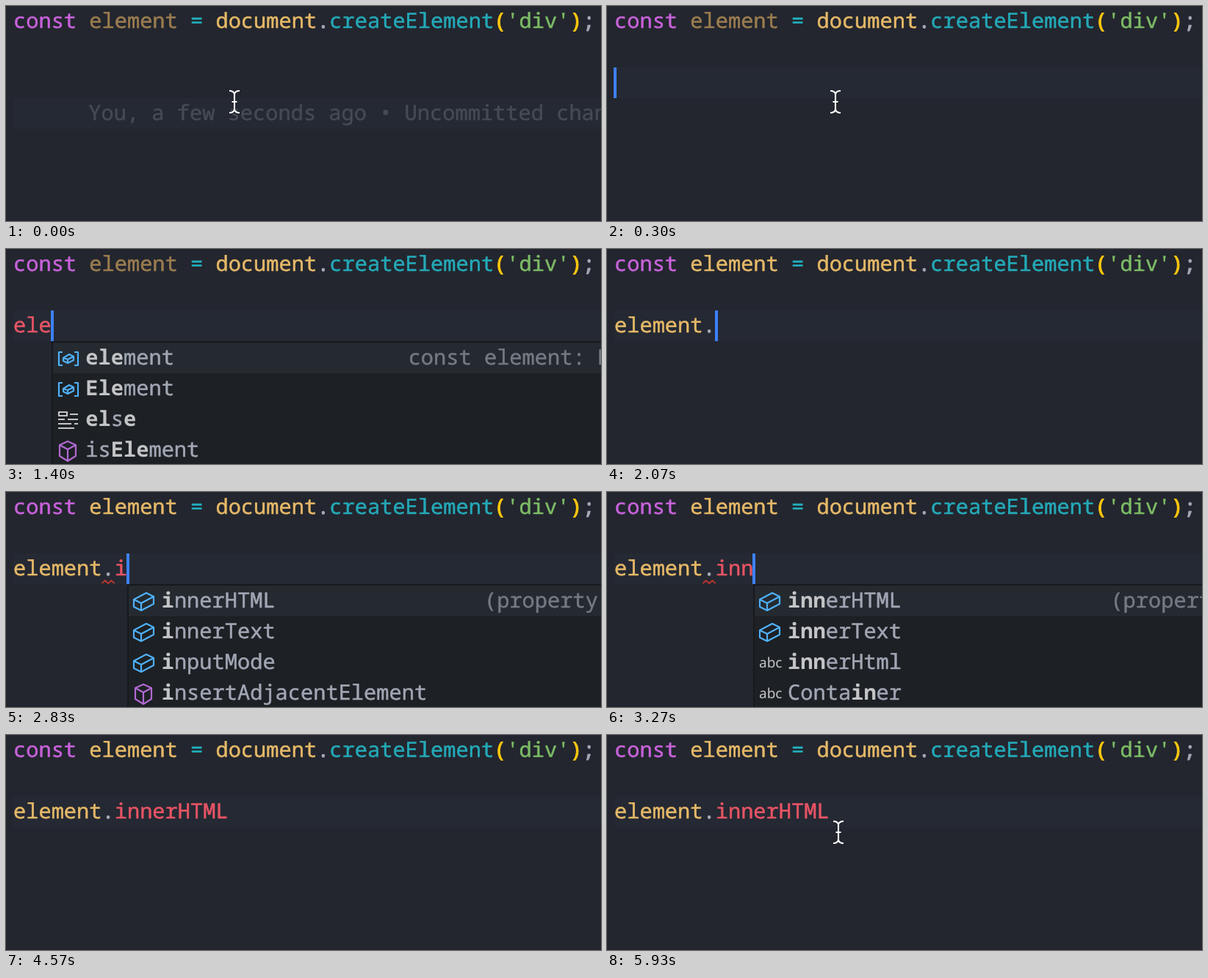
Animation, 810 px wide and 294 px high, one loop 5960 ms. Source, as an HTML page:

```html
<!DOCTYPE html>
<html lang="en">
<head>
<meta charset="utf-8">
<title>Typing with code completion</title>
<style>
  html, body { margin: 0; width: 100%; height: 100%; overflow: hidden; background: #23262e; }
  svg { display: block; width: 810px; height: 294px; }
  text {
    font: 28.7px "Noto Sans Mono", "DejaVu Sans Mono", monospace;
    font-variant-ligatures: none;
    text-rendering: geometricPrecision;
    white-space: pre;
  }
  /* A thin outline gives the letters their medium weight. */
  tspan { fill: currentColor; stroke: currentColor; stroke-width: .5; }
  .keyword { color: #c862db; }
  .name { color: #e6b968; }
  .dim { color: #9b7d50; }
  .op { color: #22b0bf; }
  .func { color: #24a9b8; }
  .paren { color: #ffc70f; stroke-width: 1; }
  .string { color: #7cbc66; }
  .punct { color: #a3a9b5; stroke-width: 1; }
  .fresh { color: #e65464; }
  .blame { color: #464a54; }
  .item { color: #a1a6b4; }
  .match { color: #c3c4c6; font-weight: 700; stroke: none; }
  .detail { color: #747983; }
  .line { fill: #252933; }
  .caret { fill: #3d80fb; }
  .panel { fill: #1d2024; }
  .edge { fill: #17191d; }
  .chosen { fill: #242a30; }
  .icon, .squiggle, .beam { fill: none; stroke-width: 2.2; }
  .icon { stroke-linejoin: round; }
  .field, .variable { stroke: #4fb0f8; }
  .method { stroke: #b169d3; }
  .snippet { stroke: #c3c4c6; }
  .abc { font: 19px "Noto Sans", "Open Sans", sans-serif; fill: #c3c4c6; }
  .squiggle { stroke: #b8342f; stroke-width: 1.8; }
  .beam { stroke: #fff; stroke-width: 2.1; }
  .beam.back { stroke: #23262e; stroke-width: 4.4; }
</style>
</head>
<body>
<svg viewBox="0 0 810 294">
  <defs>
    <path id="beam" d="M-7-15q6 0 7 4.500V10.500q-1 4.500-7 4.500M7-15q-6 0-7 4.500M0 10.500q1 4.500 7 4.500M-3.500 0h7"/>
  </defs>
  <g id="scene"></g>
  <g id="mouse">
    <use class="beam back" href="#beam"/>
    <use class="beam" href="#beam"/>
  </g>
</svg>
<script>
const LOOP = 5960, LEFT = 10, PITCH = 17.22, ROW = 42;
const scene = document.getElementById('scene');
const mouse = document.getElementById('mouse');
const colX = col => LEFT + col * PITCH;

// Icons are drawn around the left end and middle of their row.
const icons = {
  field: 'M0-3 17-12 27-7V3L10 12 0 7ZM0-3 10 2 27-7M10 2V12',
  method: 'M13-13 24-8V7L13 14 2 7V-8ZM2-8 13-2 24-8M13-2V14',
  variable: 'M6-9H1V9H6M22-9H27V9H22M7-1 15-6 21-3V2L13 6 7 3ZM7-1 13 1 21-3M13 1V6',
  snippet: 'M1-11H12V-6H1ZM16-8H27M0-1H9M13-1H27M0 5H18M22 5H27M0 11H22'
};

// Matched letters stand between asterisks.
const list = (detail, ...rows) => ({ detail, rows: rows.map(r => r.split(' ')) });
const PROP = '(property) Element';
const names = (a, b, c, d) => list('const element: HTMLDivElement',
  'variable ' + a, 'variable ' + b, 'snippet ' + c, 'method ' + d);
const inner = (p, rest) => list(PROP, `field *${p}*${rest}HTML`, `field *${p}*${rest}Text`,
  `abc *${p}*${rest}Html`, 'abc Conta*in*er');

const lists = {
  e: names('*e*lement', '*E*lement', '*e*lse', 'is*E*lement'),
  el: names('*el*ement', '*El*ement', '*el*se', 'is*El*ement'),
  ele: names('*ele*ment', '*Ele*ment', '*el*s*e*', 'is*Ele*ment'),
  dot: list(PROP, 'field accessKey', 'field accessKeyLabel',
    'method addEventListener', 'method after'),
  i: list(PROP, 'field *i*nnerHTML', 'field *i*nnerText',
    'field *i*nputMode', 'method *i*nsertAdjacentElement'),
  in: list(PROP, 'field *in*nerHTML', 'field *in*nerText',
    'field *in*putMode', 'method *in*sertAdjacentElement'),
  inn: inner('inn', 'er'),
  inne: inner('inne', 'r'),
  inner: inner('inner', '')
};

// at: start in ms; typed: text on the edited line; wave: [column, length]
const steps = [
  { at: 0, line: 3, typed: '', blame: true },
  { at: 300, line: 2, typed: '' },
  { at: 510, line: 2, typed: '', blame: true },
  { at: 640, typed: 'e', blame: true },
  { at: 860, typed: 'e', popup: 'e' },
  { at: 1060, typed: 'el', popup: 'el' },
  { at: 1290, typed: 'ele', popup: 'ele' },
  { at: 1690, typed: 'element' },
  { at: 1770, typed: 'element', known: true },
  { at: 2000, typed: 'element.', known: true },
  { at: 2150, typed: 'element.', known: true, popup: 'dot' },
  { at: 2300, typed: 'element.', known: true, popup: 'dot', wave: [7, 1] },
  { at: 2610, typed: 'element.i', known: true, popup: 'i', wave: [7, 1] },
  { at: 3060, typed: 'element.in', known: true, popup: 'in', wave: [7, 1] },
  { at: 3180, typed: 'element.inn', known: true, popup: 'inn', wave: [7, 1] },
  { at: 3310, typed: 'element.inne', known: true, popup: 'inne', wave: [8, 4] },
  { at: 3440, typed: 'element.inner', known: true, popup: 'inner', wave: [8, 4] },
  { at: 4000, typed: 'element.innerHTML', known: true }
];

const rect = (cls, x, y, w, h) =>
  `<rect class="${cls}" x="${x}" y="${y}" width="${w}" height="${h}"/>`;
const text = (x, y, spans) => `<text x="${x}" y="${y}">` +
  spans.map(([s, cls]) => `<tspan class="${cls}">${s}</tspan>`).join('') + '</text>';

function firstLine(known) {
  return text(LEFT, 30, [
    ['const ', 'keyword'], ['element', known ? 'name' : 'dim'], [' = ', 'op'],
    ['document', 'name'], ['.', 'punct'], ['createElement', 'func'], ['(', 'paren'],
    ["'div'", 'string'], [')', 'paren'], [';', 'punct']
  ]);
}

function editedLine({ typed, known }, y) {
  if (!known) return text(LEFT, y, [[typed, 'fresh']]);
  const [object, member] = typed.split('.');
  const spans = [[object, 'name']];
  if (member !== undefined) spans.push(['.', 'punct'], [member, 'fresh']);
  return text(LEFT, y, spans);
}

function squiggle([col, length]) {
  const count = Math.round(length * PITCH / 4.3);
  let d = `M${colX(col)} 125`;
  for (let i = 0; i < count; i++) d += `l4.3 ${i % 2 ? 4 : -4}`;
  return `<path class="squiggle" stroke-linejoin="round" d="${d}"/>`;
}

function icon(kind, x, y) {
  if (kind === 'abc') return `<text class="abc" x="${x - 3}" y="${y + 6}">abc</text>`;
  return `<path class="icon ${kind}" transform="translate(${x} ${y})" d="${icons[kind]}"/>`;
}

function popup({ detail, rows }, x) {
  const left = Math.round(x);
  let out = rect('edge', left, 126, 810, 168) +
    rect('panel', left + 2, 128, 810, 166) + rect('chosen', left + 2, 128, 810, ROW);
  rows.forEach(([kind, label], i) => {
    const y = 158 + i * ROW;
    const spans = label.split('*').map((s, n) => [s, n % 2 ? 'match' : 'item']);
    out += icon(kind, left + (kind === 'abc' ? 11 : 9), y - 8) + text(x + 46.7, y, spans);
  });
  return out + text(x + 486, 158, [[detail, 'detail']]);
}

function draw(step, caretOn) {
  const top = (step.line || 2) * ROW;
  const x = colX(step.typed.length);
  let out = rect('line', LEFT, top, 800, ROW) + firstLine(step.known) +
    editedLine(step, top + 30);
  if (step.blame) {
    out += text(x + 6 * PITCH - 1, top + 30,
      [['You, a few seconds ago • Uncommitted changes', 'blame']]);
  }
  if (step.wave) out += squiggle(step.wave);
  if (step.popup) out += popup(lists[step.popup], x);
  if (caretOn) out += rect('caret', Math.round(x) - 1, top, 4, ROW);
  scene.innerHTML = out;
}

let shown = '';
function tick() {
  const t = performance.now() % LOOP;
  const index = steps.findLastIndex(s => s.at <= t);
  const step = steps[index];
  // The caret restarts its blink on each key.
  const key = steps.find(s => s.typed === step.typed && s.line === step.line).at;
  const caretOn = index > 0 && (t - key) % 1000 < 500;
  const state = index + ' ' + caretOn;
  if (state !== shown) draw(step, caretOn);
  shown = state;

  const late = t > 5100;
  mouse.setAttribute('visibility', t < 640 || late ? 'visible' : 'hidden');
  mouse.setAttribute('transform', late ? 'translate(315 133)' : 'translate(311 131)');
  requestAnimationFrame(tick);
}
tick();
</script>
</body>
</html>
```
